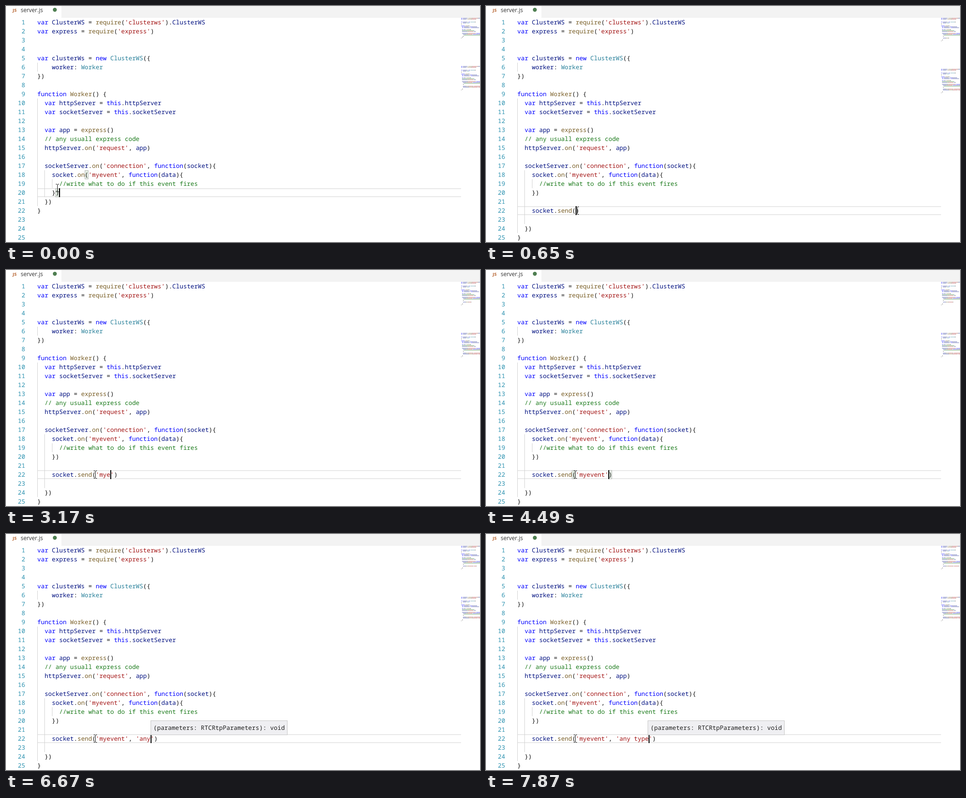
An HTML page for the animation above (7.99 s loop, 1000 by 500 pixels).

```html
<!DOCTYPE html>
<html lang="en">
<head>
<meta charset="utf-8">
<title>Editor</title>
<style>
  html, body { margin: 0; width: 100%; height: 100%; overflow: hidden; background: #fff; }
  svg { display: block; }
  .code { font: 12.83px "Noto Sans Mono", "DejaVu Sans Mono", monospace; white-space: pre;
          text-rendering: geometricPrecision; font-variant-ligatures: none; }
  .tab { font: 12px "Open Sans", "Noto Sans", sans-serif; }
  .badge { font: bold 9.5px "Open Sans", "Noto Sans", sans-serif; }
</style>
</head>
<body>
<svg id="stage" width="1000" height="500" viewBox="0 0 1000 500"></svg>
<script>
const LOOP = 7990, LEFT = 66, CHAR = 7.698, TOP = 25, ROW = 19;
const COLORS = {
  comment: '#1b7a1b', string: '#a31515', keyword: '#0000ff',
  type: '#267f99', call: '#795e26', name: '#001080', plain: '#111'
};
const SEND_ROW = 22, ARG_COL = 16;

const HEAD = `var ClusterWS = require('clusterws').ClusterWS
var express = require('express')


var clusterWs = new ClusterWS({
    worker: Worker
})

function Worker() {
  var httpServer = this.httpServer
  var socketServer = this.socketServer

  var app = express()
  // any usuall express code
  httpServer.on('request', app)

  socketServer.on('connection', function(socket){
    socket.on('myevent', function(data){
      //write what to do if this event fires
    })`.split('\n');
const TAIL = ['  })', '}'];
// Finished version further down the file, only visible in the minimap.
const LOWER = [...HEAD, '', "    socket.send('myevent', 'any type of data')",
  "    socketServer.publish('myevent', 'any data')", '', ...TAIL];
const LOWER_START = 51;

// time, send() argument with | as caret, matching brackets highlighted
const TYPING = [
  [650, '|'], [770, '|', 1], [1210, "'|'", 1], [1330, "'|'"], [1760, "''"], [2310, "'|'"],
  [2530, "'m|'"], [2740, "'my|'"], [3170, "'mye|'"], [3390, "'myev|'"], [3510, "'myeve|'"],
  [3720, "'myeven|'"], [3820, "'myevent|'"], [4270, "'myevent'"], [4380, "'myevent'|"],
  [4490, "'myevent'|", 1], [4920, "'myevent',|", 1], [5140, "'myevent', |", 1],
  [5570, "'myevent', '|'"], [6020, "'myevent', ''"], [6330, "'myevent', 'a|'"],
  [6450, "'myevent', 'an|'"], [6670, "'myevent', 'any|'"], [7100, "'myevent', 'any |'"],
  [7320, "'myevent', 'any t|'"], [7440, "'myevent', 'any ty|'"],
  [7770, "'myevent', 'any typ|'"], [7870, "'myevent', 'any type|'"]
];

const colX = col => LEFT + col * CHAR;
const rowY = row => TOP + (row - 1) * ROW;
const escape = s => s.replace(/&/g, '&amp;').replace(/</g, '&lt;');
const rect = (x, y, w, h, fill, extra = '') =>
  `<rect x="${x}" y="${y}" width="${w}" height="${h}" fill="${fill}" ${extra}/>`;
const text = (x, y, body, fill, cls = 'code', extra = '') =>
  `<text x="${x}" y="${y}" fill="${fill}" class="${cls}" ${extra}>${body}</text>`;

function tokenize(line) {
  const pattern = /\/\/.*|'[^']*'|\w+|\s+|[^\w\s']/g;
  return [...line.matchAll(pattern)].map(m => {
    const word = m[0], before = line.slice(0, m.index), after = line[m.index + word.length];
    let kind = 'plain';
    if (word.startsWith('//')) kind = 'comment';
    else if (word[0] === "'") kind = 'string';
    else if (/^(var|function|new|this)$/.test(word)) kind = 'keyword';
    else if (/(new |: )$/.test(before)) kind = 'type';
    else if (/^\w/.test(word)) kind = after === '(' ? 'call' : 'name';
    return { word, col: m.index, color: COLORS[kind] };
  });
}

const codeLine = (line, row) => text(LEFT, rowY(row) + 14,
  tokenize(line).map(t => `<tspan fill="${t.color}">${escape(t.word)}</tspan>`).join(''), COLORS.plain);

const guide = (col, from, to) =>
  rect(Math.round(colX(col)), rowY(from), 1, (to - from + 1) * ROW, '#d3d3d3');

const bracketBox = (row, col) => rect(Math.round(colX(col)) + .5, rowY(row) + .5, 7, 18,
  '#e6f0e6', 'stroke="#b9b9b9"');

const minimap = (lines, start) => lines.map((line, i) =>
  tokenize(line).filter(t => t.word.trim() && t.col < 40).map(t =>
    rect(960 + t.col, TOP + .4 + 2 * (start + i), Math.min(t.word.length, 40 - t.col), 1.2,
      t.color, 'opacity=".45"')).join('')).join('');

function mousePointer(x, y) {
  return `<path d="M${x - 3} ${y - 7.5}h2.5l1 1l1-1h2.5M${x + .5} ${y - 7}v15` +
    `M${x - 3} ${y + 8.5}h2.5l1-1l1 1h2.5" fill="none" stroke="#111"/>`;
}

function tooltip(x) {
  return rect(x + .5, 395.5, 288, 30, '#efeff2', 'stroke="#c8c8c8"') +
    text(x + 6, 415, '(parameters: RTCRtpParameters): void', '#1e1e1e');
}

function stateAt(t) {
  if (t < 100) return { lines: [...HEAD, ...TAIL], added: 0, row: 20, caret: 6,
    boxes: [[18, 13], [20, 5]], mouse: [108, 385] };
  if (t < 650) {
    const added = t < 220 ? 1 : 2;
    return { lines: [...HEAD, ...Array(added).fill(''), ...TAIL], added, row: 20 + added,
      caret: 4, boxes: [], mouse: [108, 385] };
  }
  const [, marked, matched] = TYPING.filter(s => s[0] <= t).pop();
  const arg = marked.replace('|', ''), offset = marked.indexOf('|');
  return {
    lines: [...HEAD, '', `    socket.send(${arg})`, '', ...TAIL],
    added: 3, row: SEND_ROW,
    caret: offset < 0 ? null : ARG_COL + offset,
    boxes: matched ? [[SEND_ROW, ARG_COL - 1], [SEND_ROW, ARG_COL + arg.length]] : [],
    mouse: [t < 990 ? 192 : 188, 433],
    tip: t >= 5570 ? Math.min(341, Math.round(colX(ARG_COL + arg.length - 1))) : null
  };
}

function draw(t) {
  const s = stateAt(t), last = s.lines.length;
  let out = rect(0, 0, 1000, 500, '#fff') + rect(117, 0, 883, 25, '#f3f3f3') +
    text(14, 12, 'JS', '#b5622d', 'badge') + text(31, 13, 'server.js', '#333', 'tab') +
    '<circle cx="103" cy="8" r="4.2" fill="#4f7f52"/>';
  const y = rowY(s.row);
  out += rect(LEFT, y, 894, 2, '#e8e8e8') + rect(LEFT, y + 17, 894, 2, '#e8e8e8');
  out += guide(0, 6, 6) + guide(0, 10, last - 1) + guide(2, 18, last - 2) + guide(4, 19, 19);
  out += s.boxes.map(b => bracketBox(...b)).join('');
  for (let row = 1; row <= 25; row++)
    out += text(40.5, rowY(row) + 14, row, '#2b91af', 'code', 'text-anchor="end"');
  out += s.lines.map((line, i) => codeLine(line, i + 1)).join('');
  if (s.caret !== null) out += rect(Math.round(colX(s.caret)), y, 2, ROW, '#000');
  out += minimap(s.lines, 0) + minimap(LOWER, LOWER_START + s.added);
  if (s.tip) out += tooltip(s.tip);
  return out + mousePointer(...s.mouse);
}

const stage = document.getElementById('stage');
const origin = performance.now();
let shown = '';
function tick() {
  const picture = draw((performance.now() - origin) % LOOP);
  if (picture !== shown) stage.innerHTML = shown = picture;
  requestAnimationFrame(tick);
}
tick();
</script>
</body>
</html>
```
